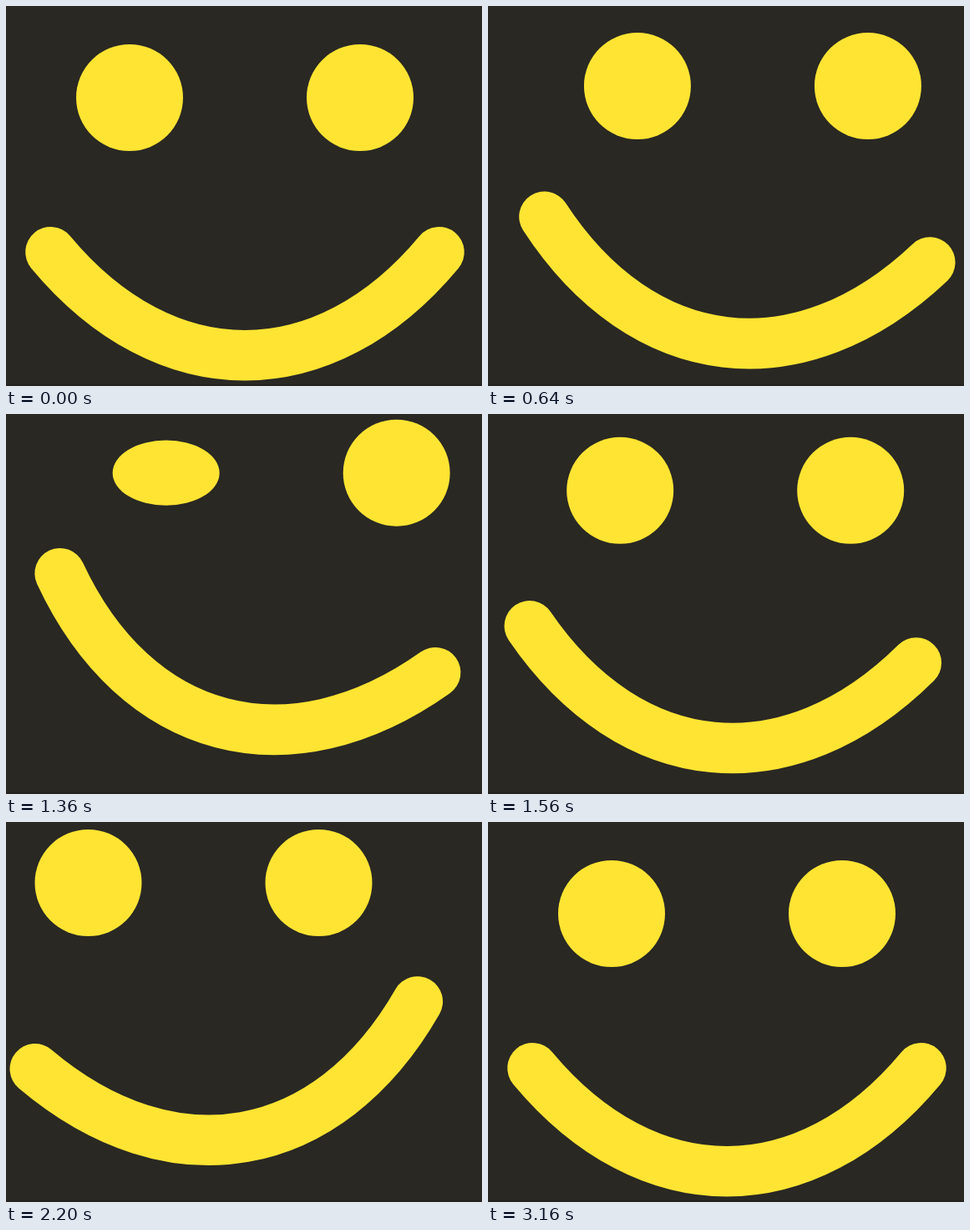
These frames come from a looping animation (570 px wide and 456 px high, 4040 ms). An HTML page with a canvas:

```html
<!DOCTYPE html>
<html lang="en">
<head>
<meta charset="utf-8">
<title>Smiling face</title>
<style>
html, body { margin: 0; width: 100%; height: 100%; overflow: hidden; background: #292823; }
canvas { display: block; }
</style>
</head>
<body>
<canvas id="stage" width="570" height="456"></canvas>
<script>
const ctx = document.getElementById('stage').getContext('2d');
const LOOP = 4040, STEP = 40;
const DARK = '#292823', EDGE = '#23221e', YELLOW = '#ffe433';
const CX = 286, PIVOT_Y = 138, EYE_Y = 110, EYE_R = 64, EYE_GAP = 138;

// Each move: time span, ease handles, path of the head, tilt in degrees.
const moves = [
  { from: 170, to: 1225, ease: [0.6, 0.3], x: [0, 38, 34, 44], y: [0, -3, -27, -40], tilt: [0, 15] },
  { from: 1320, to: 2200, ease: [0.33, 0.19], x: [44, 28, -35.7, -49.5], y: [-40, -6, -14.8, -37], tilt: [15, -10] },
  { from: 2520, to: 3160, ease: [0.33, 0.31], x: [-49.5, -37, -19.6, 0], y: [-37, -23, -12, 0], tilt: [-10, 0] }
];
const wink = { from: 1020, shut: 1240, to: 1460, min: 0.1 };

const clamp = v => Math.max(0, Math.min(1, v));
const smooth = u => u * u * (3 - 2 * u);
const lerp = (a, b, u) => a + (b - a) * u;

function bezier(p, u) {
  const v = 1 - u;
  return v * v * v * p[0] + 3 * v * v * u * p[1] + 3 * v * u * u * p[2] + u * u * u * p[3];
}

function easeAt(u, [x1, x2]) {
  if (u <= 0 || u >= 1) return clamp(u);
  let lo = 0, hi = 1;
  for (let i = 0; i < 30; i++) {
    const mid = (lo + hi) / 2;
    if (bezier([0, x1, x2, 1], mid) < u) lo = mid; else hi = mid;
  }
  return smooth(lo);
}

function poseAt(t) {
  const m = moves.filter(k => t >= k.from).pop() || moves[0];
  const p = easeAt((t - m.from) / (m.to - m.from), m.ease);
  return { x: bezier(m.x, p), y: bezier(m.y, p), tilt: lerp(m.tilt[0], m.tilt[1], p) };
}

function openAt(t) {
  const u = t < wink.shut
    ? (wink.shut - t) / (wink.shut - wink.from)
    : (t - wink.shut) / (wink.to - wink.shut);
  return lerp(wink.min, 1, smooth(clamp(u)));
}

function eye(x, y, open) {
  ctx.beginPath();
  ctx.ellipse(x, y, EYE_R, EYE_R * open, 0, 0, Math.PI * 2);
  ctx.fill();
}

function mouth(pose) {
  const top = 157.3, depth = 165.3, half = 232.5, handle = 95;
  ctx.save();
  ctx.translate(CX + pose.x, PIVOT_Y + pose.y);
  ctx.rotate(pose.tilt * Math.PI / 180);
  ctx.beginPath();
  ctx.moveTo(-half, top);
  ctx.bezierCurveTo(-handle, top + depth, handle, top + depth, half, top);
  ctx.lineWidth = 60.6;
  ctx.lineCap = 'round';
  ctx.stroke();
  ctx.restore();
}

function draw(t) {
  const pose = poseAt(t);
  ctx.fillStyle = DARK;
  ctx.fillRect(0, 0, 570, 456);
  ctx.fillStyle = EDGE;
  ctx.fillRect(0, 454, 570, 2);
  ctx.fillStyle = ctx.strokeStyle = YELLOW;
  eye(CX - EYE_GAP + pose.x, EYE_Y + pose.y, openAt(t));
  eye(CX + EYE_GAP + pose.x, EYE_Y + pose.y, 1);
  mouth(pose);
}

const start = performance.now();
function tick() {
  const t = (performance.now() - start) % LOOP;
  draw(Math.floor(t / STEP) * STEP);
  requestAnimationFrame(tick);
}
tick();
</script>
</body>
</html>
```
